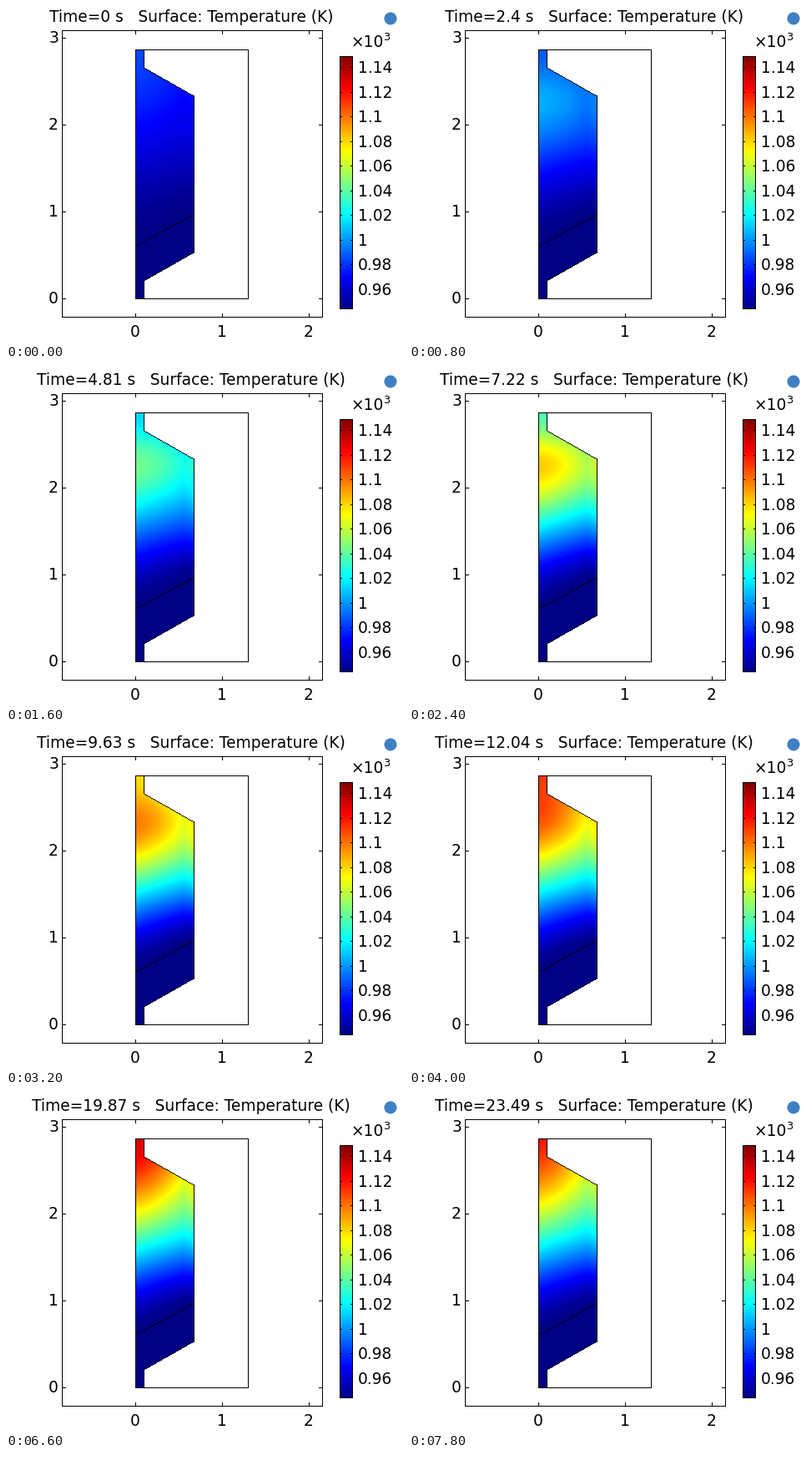
A matplotlib script that plays this animation: 476x401 px, repeating every 8 s.

```python
import math

import matplotlib.pyplot as plt
import numpy as np
from matplotlib.animation import FuncAnimation
from matplotlib.colors import LinearSegmentedColormap

W, H, DPI = 476, 401, 100
PX = 72 / DPI            # one pixel in points
FRAMES, STEP_MS = 40, 200
TIME_STEP = 50 / 83      # simulated seconds per frame
FONT = 18.67 * PX

RAINBOW = LinearSegmentedColormap.from_list("rainbow", [
    (0, (0, 0, 0.52)), (0.125, (0, 0, 1)), (0.375, (0, 1, 1)),
    (0.625, (1, 1, 0)), (0.875, (1, 0, 0)), (1, (0.5, 0, 0))], N=512)

# Pixel grid over the heated body
LEFT, RIGHT, TOP, BOTTOM = 155, 225, 52, 350
KINK = 0.82              # radius where the outer wall begins
gx, gy = np.meshgrid(np.arange(LEFT, RIGHT + 1), np.arange(TOP, BOTTOM + 1))
inside = gx <= np.interp(gy, [73, 107, 295, 329], [165, 225, 225, 165])
radius = (gx - LEFT) / (RIGHT - LEFT)

# Outline: body pixels with an outside neighbour, plus the inner line
pad = np.pad(inside, 1)
core = pad[:-2, 1:-1] & pad[2:, 1:-1] & pad[1:-1, :-2] & pad[1:-1, 2:]
black = (inside & ~core) | (gy == np.round(287 - 38 * radius))

# Depth runs from 0 at the top to 1 at the inner line
inner = np.minimum(radius, KINK)
depth = np.clip((gy - TOP) / (287 - 38 * inner - TOP), 0, 1)
profile = np.sin(1.45 * (1 - depth)) ** 1.7
cool_top = np.exp(-(depth / 0.22) ** 2)
blend = (inner / KINK) ** 1.6
radial = 1 - blend * (0.25 - 0.7 * depth ** 2)
radial *= 1 + 0.06 * (radius - inner) / (1 - KINK)


def field(n):
    heat = np.interp(n, [0, 4, 13, 26, 39], [0.2, 0.42, 1.03, 1, 0.87])
    lag = np.interp(n, [0, 4, 12, 24], [0, 0.48, 0.52, 0])
    u = heat * profile * radial * (1 - lag * cool_top)
    rgba = RAINBOW(np.clip(u, 0, 1))
    rgba[black, :3] = 0
    rgba[..., 3] = inside
    return rgba


def title_text(n):
    seconds = math.floor(n * TIME_STEP * 100) / 100
    return f"Time={seconds:g} s   Surface: Temperature (K)"


plt.rcParams["font.family"] = "DejaVu Sans"
fig = plt.figure(figsize=(W / DPI, H / DPI), dpi=DPI, facecolor="white")
ax = fig.add_axes([0, 0, 1, 1])
ax.axis("off")


def line(xs, ys):
    # Whole coordinates snap to the centre of that pixel
    ax.plot(xs, ys, color="black", lw=PX, antialiased=False, snap=True,
            solid_capstyle="projecting", solid_joinstyle="miter")


def box(x0, y0, x1, y1):
    line([x0, x1, x1, x0, x0], [y0, y0, y1, y1, y0])


def label(x, y, s, ha="left", size=FONT):
    return ax.text(x, y, s, ha=ha, va="baseline", fontsize=size, color="black")


def picture(data, x0, y0, x1, y1):
    return ax.imshow(data, extent=(x0, x1 + 1, y1 + 1, y0), aspect="auto",
                     interpolation="nearest", zorder=1)


# Heated body and its enclosure
body = picture(field(0), LEFT, TOP, RIGHT, BOTTOM)
box(LEFT, TOP, 290, BOTTOM)

# Plot frame with ticks on all sides
box(67, 29, 379, 372)
for v in range(4):
    y = 350 - 104 * v
    line([67, 71], [y, y])
    line([375, 379], [y, y])
    label(63, y + 6, str(v), "right")
for v in range(3):
    x = 155 + 104 * v
    line([x, x], [368, 372])
    line([x, x], [29, 33])
    label(x, 396, str(v), "center")

# Colour scale
ramp = RAINBOW(np.linspace(1, 0, 303))[:, None, :]
picture(ramp, 400, 60, 415, 362)
box(400, 60, 415, 362)
for k in range(10):
    y = round(339 - 29.56 * k)
    line([400, 402], [y, y])
    line([413, 415], [y, y])
    label(422, y + 7, f"{0.96 + 0.02 * k:.4g}")
label(413, 49, "×10")
label(452, 41, "3", size=13 * PX)

# Corner badge
ax.add_patch(plt.Circle((461, 15), 7.5, color="#3f7fc4", lw=0))

title = label(222, 19, title_text(0), "center")
ax.set_xlim(0, W)
ax.set_ylim(H, 0)


def update(n):
    body.set_data(field(n))
    title.set_text(title_text(n))
    return body, title


anim = FuncAnimation(fig, update, frames=FRAMES, interval=STEP_MS,
                     repeat=True, repeat_delay=0, blit=False)
plt.show()
```
